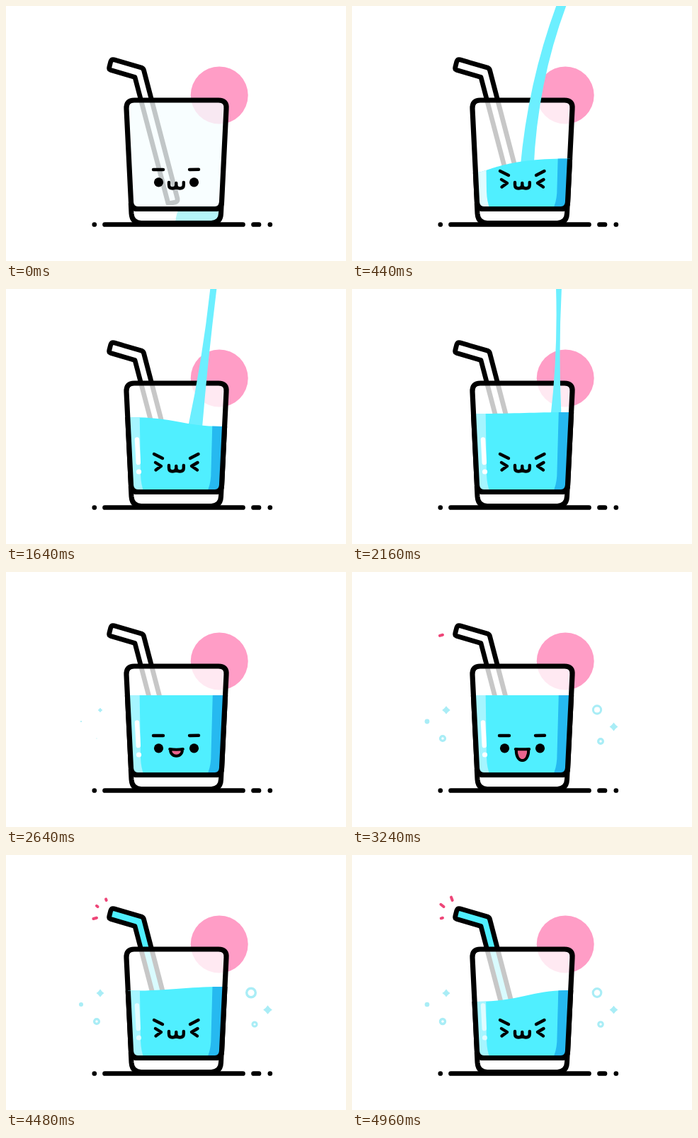
An HTML page for the animation above (5000 ms loop, 480 by 360 pixels).

```html
<!DOCTYPE html>
<html lang="en">
<head>
<meta charset="utf-8">
<title>Happy drink</title>
<style>
  html, body { margin: 0; width: 100%; height: 100%; overflow: hidden; background: #fff; }
  svg { display: block; width: 100vw; height: 100vh; }
  .ink { fill: none; stroke: #000; stroke-linecap: round; stroke-linejoin: round; }
  .bubble { fill: none; stroke: #a9edf6; stroke-width: 3.2; }
  .solid { fill: #a9edf6; stroke: none; }
  #tint { fill: #f8feff; mix-blend-mode: multiply; }
</style>
</head>
<body>
<svg viewBox="0 0 480 360">
  <defs>
    <path id="glass" d="M181 133H300Q312 133 311 145L304.500 277Q304 286.500 295 286.500H186Q177 286.500 176.500 277L170 145Q169.500 133 181 133Z"/>
    <clipPath id="inside"><use href="#glass"/></clipPath>
    <clipPath id="body"><path id="waterClip"/></clipPath>
    <clipPath id="fall"><rect id="fallBox" x="150" width="220"/></clipPath>
  </defs>

  <circle cx="301.200" cy="126" r="40.500" fill="#ff9dc6"/>

  <path d="M229 279L183 101L146 90L150.500 76L194 88L243 275Z" fill="#fff"/>
  <path id="sip" d="M235.500 277L189 94.500L149 83" fill="none" stroke="#50efff" stroke-width="12" stroke-linejoin="round" pathLength="100" stroke-dasharray="100 200"/>
  <path class="ink" stroke-width="6.800" d="M229 279L182 100.500L148 90.500Q145 89.500 145.800 86.500L147.800 78.500Q149 75 152.500 75.800L191 87Q193.800 88 194.500 90.500L242 272Q242.500 276 239 277Z"/>

  <path d="M176.500 281L177 293Q178 306 191 306H290Q303 305 303.500 293L304 281Z" fill="#fff"/>
  <path id="glow" d="M239 306Q240 293 246 282H302V294Q302 306 290 306Z" fill="#b4f5f8"/>
  <use href="#glass" fill="#fff" opacity=".78"/>
  <use href="#glass" id="tint"/>

  <path class="ink" stroke-width="7" d="M176.300 279L177 293Q178 306.500 191 306.500H290Q303 306 303.500 293L304.200 279"/>
  <use href="#glass" class="ink" stroke-width="7.200"/>

  <g clip-path="url(#fall)"><path id="stream" fill="#6cefff"/></g>

  <g clip-path="url(#body)">
    <g clip-path="url(#inside)">
      <rect x="165" y="130" width="150" height="160" fill="#50efff"/>
      <path id="light" d="M165 130H188L190 262Q190.500 278 196 290H165Z"/>
      <path d="M293 130H315V290H281Q288 282 289.300 264Z" fill="#26b9f0"/>
      <g id="shine" fill="#fff">
        <path d="M185 212.500L186.800 245" stroke="#fff" stroke-width="6.500" stroke-linecap="round"/>
        <circle cx="187.500" cy="258" r="3.600"/>
      </g>
    </g>
    <use href="#glass" class="ink" stroke-width="7.200"/>
  </g>

  <path class="ink" stroke-width="6.700" d="M139.500 308.500H334.500M349.500 308.500H357M124.800 308.500h.01M372.800 308.500h.01"/>

  <path id="brows" class="ink" stroke-width="4.400"/>
  <g id="dots"><circle cx="215.500" cy="248.800" r="6.600"/><circle cx="265.500" cy="248.800" r="6.600"/></g>
  <path id="squint" class="ink" stroke-width="4.400" d="M211 245L219 250L211.500 255.500M270.500 245L262 250L270 255.500"/>
  <path id="lips" class="ink" stroke-width="4.400" d="M230 249V252.500Q230 257.500 235 257.500Q240.300 257.500 240.300 252V250V252Q240.300 257.500 245.500 257.500Q250.800 257.500 250.800 252.500V249"/>
  <path id="mouth" class="ink" stroke-width="4" style="fill:#ea648e"/>

  <g id="bubbles"></g>
  <path id="sparks" fill="none" stroke="#ee4678" stroke-width="4" stroke-linecap="round"/>
</svg>
<script>
const LOOP = 5000;
const $ = id => document.getElementById(id);
const set = (id, name, value) => $(id).setAttribute(name, value);
const show = (id, on) => set(id, 'visibility', on ? 'visible' : 'hidden');
const clamp = v => Math.max(0, Math.min(1, v));
const ramp = (t, a, b) => clamp((t - a) / (b - a));
const smooth = v => v * v * (3 - 2 * v);
const ease = (t, a, b) => smooth(ramp(t, a, b));
const mix = (a, b, k) => a + (b - a) * k;

// Eased values between rows of [time, ...values].
function track(rows, t) {
  let i = 0;
  while (i < rows.length - 2 && t >= rows[i + 1][0]) i++;
  const [a, b] = [rows[i], rows[i + 1]];
  const k = ease(t, a[0], b[0]);
  return a.slice(1).map((v, n) => mix(v, b[n + 1], k));
}

// time, left level, right level
const LEVELS = [
  [100, 286, 286], [280, 262, 252], [440, 235, 215.5], [780, 205, 216],
  [1160, 206, 187], [1640, 181, 194], [2160, 176, 174], [2600, 174, 174],
  [3840, 174, 174], [4000, 184, 174], [4320, 181, 188], [4640, 202, 184], [4960, 207, 191]
];

// time, top x, top width, bend x, bend y, middle width, end x, end width
const POUR = [
  [100, 296, 13, 260, 110, 13, 254, 15], [440, 296, 14, 255, 108, 15, 247, 19],
  [1160, 294.5, 11, 286, 105, 15, 232, 27], [1700, 293, 9, 281, 100, 11, 268, 20],
  [2160, 292, 8, 291, 90, 6, 288, 15], [2440, 292, 7, 292, 90, 5, 290, 12]
];

const BUBBLES = [
  ['star', 133, 195, 5.8], ['dot', 106, 211, 3.2], ['ring', 128, 235, 3.3],
  ['ring', 346, 194.5, 5.9], ['star', 369.5, 218.5, 6.3], ['ring', 351, 239, 3.3]
];

// inner x, inner y, outer x, outer y, delay
const SPARKS = [
  [128, 88.8, 121, 90.6, 0], [129.5, 73, 123.5, 68.3, 80], [141.7, 64, 139.2, 57.5, 80]
];

const bubbles = BUBBLES.map(([kind, x, y, r]) => {
  const el = document.createElementNS('http://www.w3.org/2000/svg', kind === 'star' ? 'path' : 'circle');
  if (kind === 'star') {
    const c = r * .4;
    el.setAttribute('d', `M0 ${-r}Q${c} ${-c} ${r} 0Q${c} ${c} 0 ${r}Q${-c} ${c} ${-r} 0Q${-c} ${-c} 0 ${-r}Z`);
  } else {
    el.setAttribute('r', r);
  }
  el.setAttribute('class', kind === 'ring' ? 'bubble' : 'solid');
  $('bubbles').append(el);
  return { el, x, y };
});

function drawWater(t) {
  const [l, r] = track(LEVELS, t);
  const bend = ease(t, 400, 1000);
  const x1 = mix(190, 235, bend), x2 = mix(212, 255, bend);
  set('waterClip', 'd', `M150 ${l}H176C${x1} ${l} ${x2} ${r} 303 ${r}H330V300H150Z`);
  const tone = ease(t, 400, 800);
  set('light', 'fill', `rgb(${mix(225, 165, tone)} ${mix(252, 245, tone)} 255)`);
  set('shine', 'opacity', tone * mix(1, .65, ease(t, 3700, 4600)));
  return [l, r];
}

function drawStream(t, [l, r]) {
  const on = t > 60 && t < 2460;
  show('stream', on);
  if (!on) return;
  const [x0, w0, cx, cy, wm, x1, w1] = track(POUR, t);
  const end = Math.min(283, mix(l, r, smooth(clamp((x1 - 177) / 126))) + 5);
  const wc = 2 * wm - (w0 + w1) / 2;
  const side = s => [x0 + s * w0 / 2, cx + s * wc / 2, x1 + s * w1 / 2];
  const [a0, ac, a1] = side(-1), [b0, bc, b1] = side(1);
  set('stream', 'd', `M${a0} -2Q${ac} ${cy} ${a1} ${end}H${b1}Q${bc} ${cy} ${b0} -2Z`);
  const tail = 190 * ramp(t, 2300, 2460) ** 1.4;
  const head = 290 * ramp(t, 60, 200);
  set('fallBox', 'y', tail);
  set('fallBox', 'height', Math.max(0, head - tail));
}

function drawFace(t) {
  const open = ease(t, 2480, 2760) * (1 - ease(t, 3860, 4120));
  const tight = ease(t, 140, 280) * (1 - ease(t, 2400, 2520)) + ease(t, 4060, 4180);
  const outer = mix(231, 233, tight), inner = mix(231, 239, tight);
  set('brows', 'd', `M${mix(208, 209, tight)} ${outer}L${mix(222, 221, tight)} ${inner}`
    + `M${mix(272, 271.5, tight)} ${mix(230.7, 233, tight)}L${mix(259, 260, tight)} ${inner}`);
  show('dots', tight < .5);
  show('squint', tight >= .5);
  show('lips', open < .15);
  show('mouth', open >= .15);
  const w = 8.7 + open, low = 250 + 16 * open;
  set('mouth', 'd', `M${240.5 - w} 250Q240.500 ${mix(253, 250.5, open)} ${240.5 + w} 250`
    + `M${241.5 - w} 250.500C${241 - w} ${mix(250, low, .6)} ${240.5 - w * .55} ${low} 240.500 ${low}`
    + `S${240 + w} ${mix(250, low, .6)} ${239.5 + w} 250.500`);
}

function drawSparkles(t) {
  bubbles.forEach(({ el, x, y }, i) => {
    const grow = ease(t, 2480 + i * 50, 2760 + i * 50);
    const size = grow * (1 + .07 * Math.sin((t - 3240) / 300 + i * 1.3));
    el.setAttribute('transform', `translate(${x} ${y}) scale(${size})`);
  });
  let d = '';
  for (const [ix, iy, ox, oy, delay] of SPARKS) {
    const age = t - 3160 - delay;
    if (age <= 0) continue;
    const k = Math.sin(Math.PI * (age % 610) / 610) ** .6;
    if (k > .1) d += `M${ix} ${iy}L${mix(ix, ox, k)} ${mix(iy, oy, k)}`;
  }
  set('sparks', 'd', d);
}

function render(t) {
  const fade = 1 - ramp(t, 20, 120);
  set('glow', 'opacity', fade);
  set('tint', 'opacity', fade);
  drawStream(t, drawWater(t));
  const sip = ease(t, 4040, 4360);
  set('sip', 'stroke-dashoffset', 100 * (1 - sip));
  show('sip', sip > 0);
  drawFace(t);
  drawSparkles(t);
}

const start = performance.now();
function tick() {
  render((performance.now() - start) % LOOP);
  requestAnimationFrame(tick);
}
render(0);
requestAnimationFrame(tick);
</script>
</body>
</html>
```
